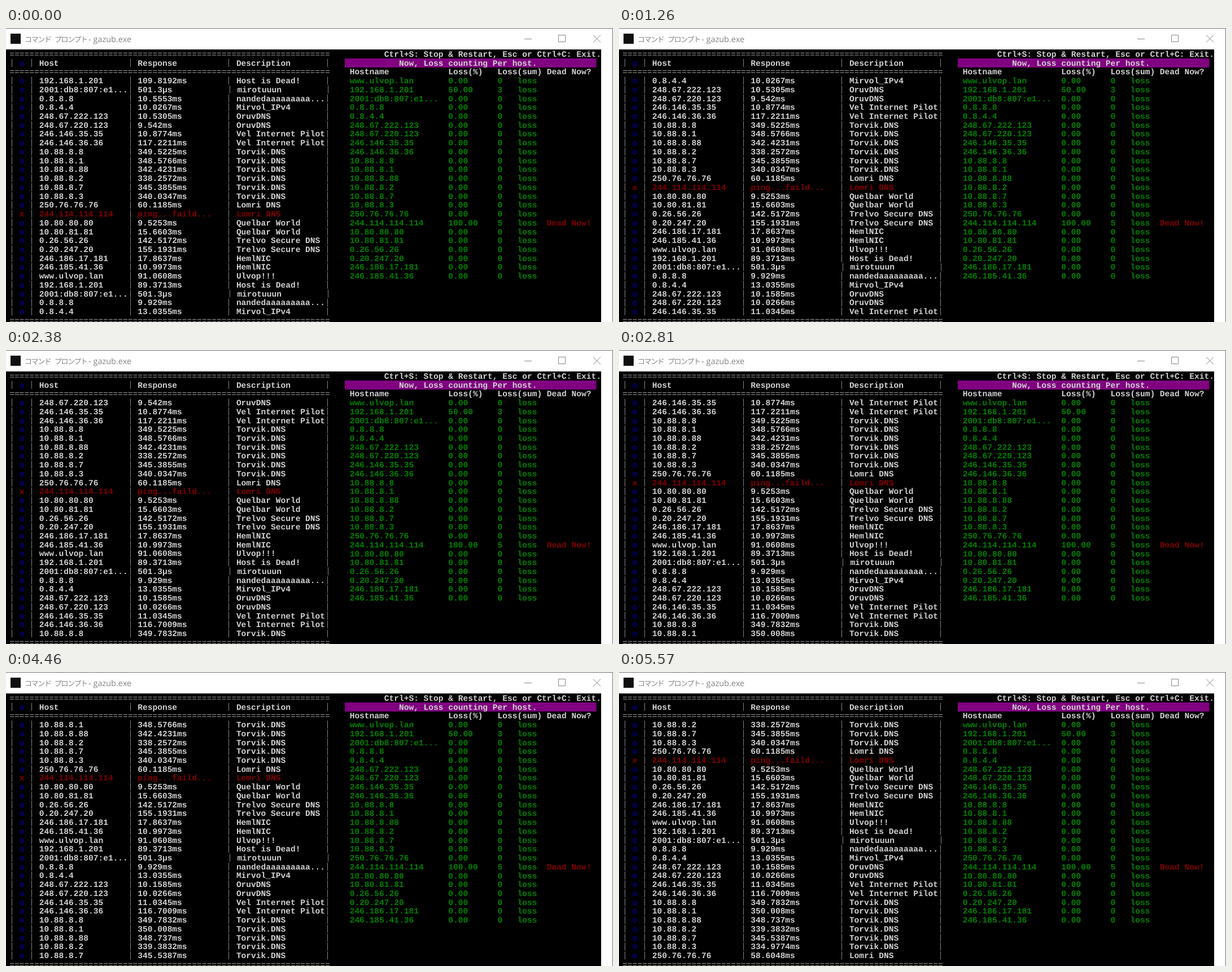
An HTML page that plays this animation: 1075 by 521 pixels, repeating every 8 s.

```html
<!DOCTYPE html>
<html lang="ja">
<head>
<meta charset="utf-8">
<title>Ping monitor</title>
<style>
  html, body { margin: 0; width: 100%; height: 100%; overflow: hidden; background: #fff; }
  svg { display: block; width: 1075px; height: 521px; }
  text { text-rendering: geometricPrecision; }
  .title { font: 14.5px "Open Sans", sans-serif; fill: #858585; }
  .kana { font: 13px "Noto Sans CJK JP", "Noto Sans CJK", sans-serif; letter-spacing: -1.4px; }
  .console { font: bold 14.55px "Liberation Mono", monospace; }
  .console .rule { font-weight: normal; }
  .buttons { fill: none; stroke: #858585; stroke-width: 1; }
</style>
</head>
<body>
<svg viewBox="0 0 1075 521">
  <defs><clipPath id="window"><rect x="0" y="85" width="590" height="425"/></clipPath></defs>
  <rect width="1075" height="521" fill="#fff"/>
  <rect y="38" width="1054" height="483" fill="#000"/>
  <path d="M0 .5H1074.5V521" fill="none" stroke="#707070"/>
  <rect x="8" y="10" width="18" height="18" fill="#101010"/>
  <g class="title">
    <text class="kana" x="33" y="25">コマンド</text>
    <text class="kana" x="86" y="25">プロンプト</text>
    <text x="146" y="25">- gazub.exe</text>
  </g>
  <path class="buttons" d="M918 19.5H931M978.5 12.5H990.5V24.5H978.5ZM1040 12.5L1053 25.5M1053 12.5L1040 25.5"/>
  <rect x="600" y="54" width="445.5" height="16" fill="#800080"/>
  <g id="fixed" class="console"></g>
  <g clip-path="url(#window)"><g id="log" class="console"></g></g>
</svg>
<script>
const LEFT = 6.3, CELL = 8.73, TOP = 50.9, PITCH = 15.73;
const LOOP = 8000, FIRST_ROW = 3;
const STEPS = [140, 700, 1260, 1690, 2380, 2810, 3470, 3900, 4460, 5040, 5570];
const COLOR = {
  text: '#d2d2d2', rule: '#a0a0a0', pipe: '#858585',
  ok: '#000080', fail: '#800000', loss: '#008000'
};

const hosts = `192.168.1.201|Host is Dead!
2001:db8:807:e1...|mirotuuun
0.8.8.8|nandedaaaaaaaaa...
0.8.4.4|Mirvol_IPv4
248.67.222.123|OruvDNS
248.67.220.123|OruvDNS
246.146.35.35|Vel Internet Pilot
246.146.36.36|Vel Internet Pilot
10.88.8.8|Torvik.DNS
10.88.8.1|Torvik.DNS
10.88.8.88|Torvik.DNS
10.88.8.2|Torvik.DNS
10.88.8.7|Torvik.DNS
10.88.8.3|Torvik.DNS
250.76.76.76|Lomri DNS
244.114.114.114|Lomri DNS
10.80.80.80|Quelbar World
10.80.81.81|Quelbar World
0.26.56.26|Trelvo Secure DNS
0.20.247.20|Trelvo Secure DNS
246.186.17.181|HemlNIC
246.185.41.36|HemlNIC
www.ulvop.lan|Ulvop!!!`.split('\n').map(line => line.split('|'));

const replies = `109.8192ms 501.3μs 10.5553ms 10.0267ms 10.5305ms 9.542ms 10.8774ms
  117.2211ms 349.5225ms 348.5766ms 342.4231ms 338.2572ms 345.3855ms 340.0347ms
  60.1185ms ping...faild... 9.5253ms 15.6603ms 142.5172ms 155.1931ms 17.8637ms
  10.9973ms 91.0608ms 89.3713ms 501.3μs 9.929ms 13.0355ms 10.1585ms 10.0266ms
  11.0345ms 116.7009ms 349.7832ms 350.008ms 348.737ms 339.3832ms 345.5387ms
  334.9774ms 58.6048ms`.split(/\s+/);

const fixed = document.getElementById('fixed');
const log = document.getElementById('log');

function add(parent, tag, attrs, content = '') {
  const node = document.createElementNS(parent.namespaceURI, tag);
  for (const key in attrs) node.setAttribute(key, attrs[key]);
  node.textContent = content;
  parent.append(node);
}

function put(parent, col, row, content, color = COLOR.text, shift = 0, kind = '') {
  add(parent, 'text', {
    x: LEFT + col * CELL + shift, y: TOP + row * PITCH, fill: color, class: kind
  }, content);
}

function tableRow(parent, row, mark, cells, color) {
  // The wide micro sign pushes the rest of its line to the right.
  const push = cells[1].includes('μ') ? 1.5 : 0;
  [0, 4, 24, 44, 64].forEach(col => add(parent, 'rect', {
    x: Math.round(LEFT + (col + .5) * CELL - .6 + (col > 26 ? push : 0)),
    y: TOP + row * PITCH - 11.8, width: 1, height: 14, fill: COLOR.pipe
  }));
  put(parent, 2, row, mark, mark === 'x' ? COLOR.fail : COLOR.ok);
  cells.forEach((cell, i) => put(parent, 6 + 20 * i, row, cell, color, i === 2 ? push : 0));
}

[0, 2, 30].forEach(row => put(fixed, 0, row, '='.repeat(65), COLOR.rule, 0, 'rule'));
tableRow(fixed, 1, 'o', ['Host', 'Response', 'Description']);

put(fixed, 76, 0, 'Ctrl+S: Stop & Restart, Esc or Ctrl+C: Exit.');
put(fixed, 79, 1, 'Now, Loss counting Per host.');
[[69, 'Hostname'], [89, 'Loss(%)'], [99, 'Loss(sum)'], [109, 'Dead Now?']]
  .forEach(([col, label]) => put(fixed, col, 2, label));

const losses = { 1: ['50.00', '3'], 16: ['100.00', '5'] };
[hosts[22], ...hosts.slice(0, 22)].forEach(([host], i) => {
  const row = FIRST_ROW + i, [percent, sum] = losses[i] || ['0.00', '0'];
  [[69, host], [89, percent], [99, sum], [103, 'loss']]
    .forEach(([col, value]) => put(fixed, col, row, value, COLOR.loss));
  if (sum === '5') put(fixed, 109, row, 'Dead Now!', COLOR.fail);
});

replies.forEach((reply, i) => {
  const [host, description] = hosts[i % hosts.length];
  const failed = reply.startsWith('ping');
  tableRow(log, FIRST_ROW + i, failed ? 'x' : 'o', [host, reply, description],
    failed ? COLOR.fail : COLOR.text);
});

function draw() {
  const time = performance.now() % LOOP;
  const scrolled = STEPS.filter(step => step <= time).length;
  log.setAttribute('transform', `translate(0 ${-scrolled * PITCH})`);
  requestAnimationFrame(draw);
}
draw();
</script>
</body>
</html>
```
